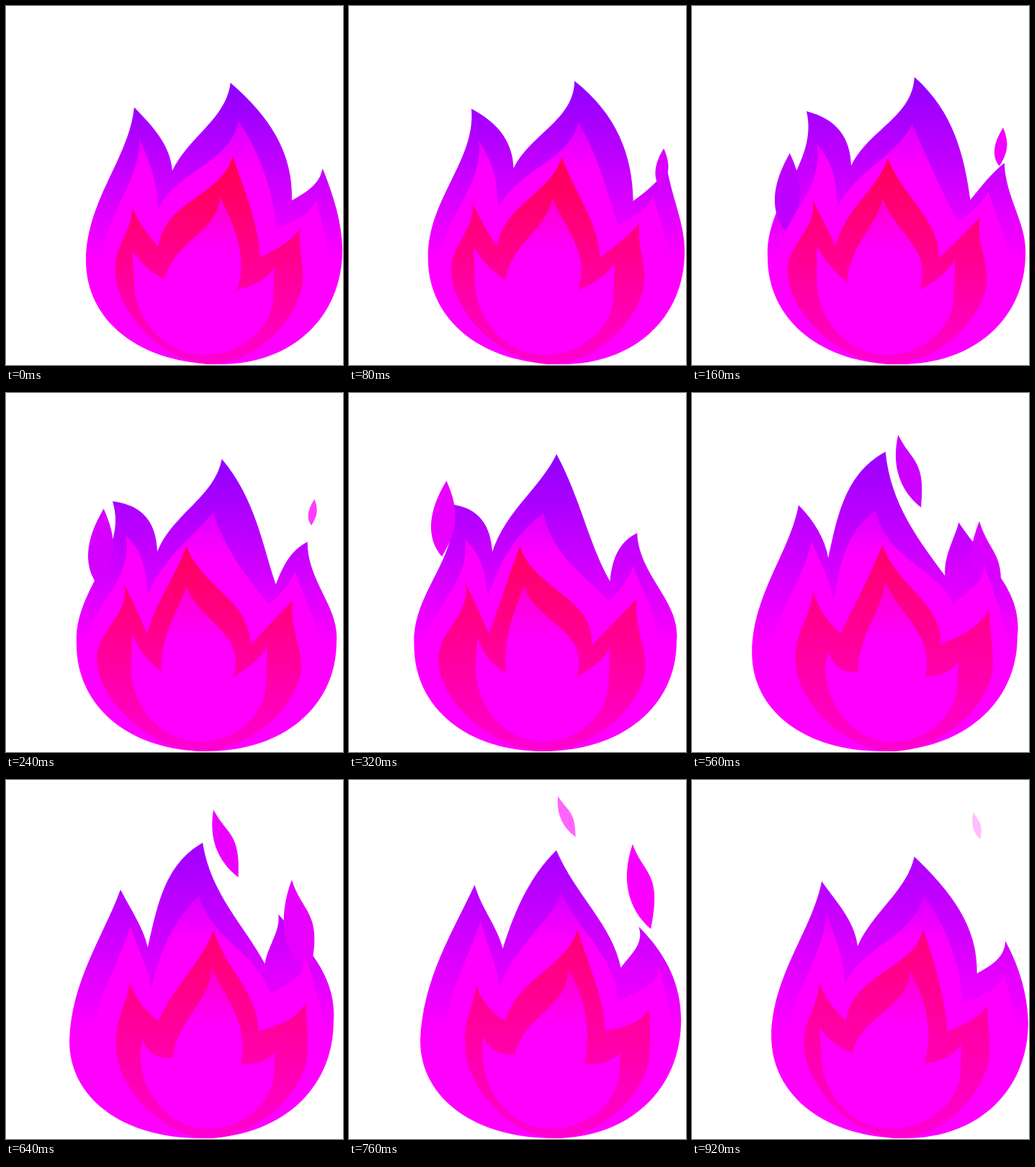
Animation, 468 px wide and 498 px high, one loop 960 ms. Source, as an HTML page:

```html
<!DOCTYPE html>
<html lang="en">
<head>
<meta charset="utf-8">
<title>Flame</title>
<style>
html, body { margin: 0; width: 100%; height: 100%; overflow: hidden; background: #fff; }
svg { display: block; width: 100vw; height: 100vh; }
</style>
</head>
<body>
<svg viewBox="0 0 468 498">
  <defs>
    <linearGradient id="hull" gradientUnits="userSpaceOnUse" x1="0" y1="100" x2="0" y2="352">
      <stop id="hullTop"/><stop offset="1" stop-color="#f0f"/>
    </linearGradient>
    <linearGradient id="glow" gradientUnits="userSpaceOnUse" x1="0" y1="155" x2="0" y2="225">
      <stop stop-color="#d800ff"/><stop offset="1" stop-color="#f0f"/>
    </linearGradient>
    <linearGradient id="red" gradientUnits="userSpaceOnUse" x1="0" y1="205" x2="0" y2="492">
      <stop id="redTop"/><stop offset="1" stop-color="#ff00d2"/>
    </linearGradient>
    <linearGradient id="core" gradientUnits="userSpaceOnUse" x1="0" y1="258" x2="0" y2="345">
      <stop stop-color="#ff00cc"/><stop offset="1" stop-color="#f0f"/>
    </linearGradient>
  </defs>
  <g id="art"></g>
</svg>
<script>
const LOOP = 960, STEP = 40;
const mix = (a, b, u) => a + (b - a) * u;

// Every value sways once per loop: [x, y, cosX, cosY, sinX, sinY].
function sway([x, y, cx = 0, cy = 0, sx = 0, sy = 0], t) {
  const w = 2 * Math.PI * t / LOOP, c = Math.cos(w), s = Math.sin(w);
  return [x + cx * c + sx * s, y + cy * c + sy * s];
}

// points: left side, tip, valley, tip, valley, tip, right side, bottom.
// bends: sideways pull of the two handles between neighbours, per unit length.
const layers = [
  { fill: 'url(#hull)', round: 0.59,
    points: [
      [96.5, 355, 14.5, -2, 1.4, -7], [159, 149, 19, -8.4, -11, 1.3],
      [209, 227, 22, 1.7, 1.2, -6.9], [291, 92.7, 20.7, 13.7, 8.7, -1.2],
      [373, 262, 24, 7.7, 1.7, 3.5], [406, 202, 33.7, 23.3, 12.7, 4.6],
      [459, 339, 8.2, -1.7, 0, 5.8], [279.5, 497, 18]
    ],
    bends: [
      [-.11, .08, 0, -.015, 0, .11], [-.14, -.155, .055, 0, -.18, -.1],
      [-.08, 0, .03, .155, 0, .14], [-.02, -.045, -.125, -.13, -.09, .02],
      [-.03, .04, .14, .16, -.07, -.2], [-.01, -.14, -.04, .07, .12, .02]
    ] },
  { fill: 'url(#glow)', round: 0.59,
    points: [
      [117, 360, 13.3, 0, -10.4], [173, 196, 12.3, -11.2, -7.5, 1],
      [202, 285, 9, -2.8, -4.8, -5.5], [287, 162, 36, -2.9, 1, 3.3],
      [368, 298, 8, 10.8, -2.9, -5.5], [414, 250.5, 17, 17, -12.7, -2.6],
      [440, 365, 6, 0, -4.6], [279.5, 495, 18]
    ],
    bends: [
      [-.08, .1, 0, 0, 0, .1], [-.07, -.08, 0, 0, -.12],
      [-.1, -.01, 0, .2], [.07, -.05, -.16, -.02, .02, .1],
      [.08, .2, 0, 0, 0, -.12], [-.02, -.1]
    ] },
  { fill: 'url(#red)', round: 0.47,
    points: [
      [143, 368, 8.7, -3, -16.7], [169, 273, 5.5, 5, -6.6, -10.5],
      [206, 334, 5.2, 0, -10], [280, 209.7, 34.7, -1.8, -29.4, 2.3],
      [347, 349, 6, 0, -7.5, 1], [408, 301, 0, 8.8, -9.5, -14],
      [414, 376, -2, 0, -4], [280, 497, 5.3, 0, -6.4]
    ],
    bends: [
      [-.11, .13, 0, 0, 0, .11], [.06, .05, 0, 0, -.08, -.06],
      [-.085, .07, -.12, .08, .03, -.04], [.045, -.15, -.07, .085, .04, -.06],
      [.05, .1, 0, 0, -.06, -.1], [.05, -.03, 0, 0, .06]
    ] },
  { fill: 'url(#core)', round: 0.54,
    points: [
      [180, 380, -2.3, 0, -6.4], [181, 346, -5.5, -6.5, -6, -11.8],
      [224, 384, -3, -4.8, -7.9, 2], [275, 264, 22, 1, -24, 4],
      [321, 394, 0, 0, -5.9], [369.6, 365, 3, -1.8, -6.5, -14],
      [368, 402, 3.3, 0, -7], [274.5, 484, 0, 0, -6]
    ],
    bends: [
      [0, 0], [.17, .17, -.07, -.07, -.07, -.07],
      [-.13, .09, -.02, .095, 0, -.11], [-.03, -.235, -.08, .065, .09, -.095],
      [.11, .14, 0, 0, -.04, -.04], [0, 0]
    ] }
];

// Loose sparks: tip starts at x, y and drifts; size shrinks from h.
const sparks = [
  { t0: 120, life: 440, x: 136, dx: -1, y: 228, rise: 178, h: 110, lean: -.08, red: 180 },
  { t0: 40, life: 260, x: 440, dx: -13, y: 214, rise: 75, h: 56, lean: -.13, red: 205 },
  { t0: 440, life: 520, x: 403, dx: -12, y: 244, rise: 204, h: 138, lean: .25, red: 195 },
  { t0: 400, life: 440, x: 282, dx: 9, y: 98, rise: 82, h: 103, lean: .45, red: 130 }
];

const art = document.getElementById('art');
function addPath(fill) {
  const p = document.createElementNS('http://www.w3.org/2000/svg', 'path');
  p.setAttribute('fill', fill);
  return art.appendChild(p);
}
layers.forEach((layer, i) => {
  layer.path = addPath(layer.fill);
  if (i === 0) sparks.forEach(s => { s.path = addPath('none'); });
});

function curve([ax, ay], [bx, by], [p, q]) {
  const dx = bx - ax, dy = by - ay;
  const handle = (u, bend) => `${ax + dx * u - dy * bend} ${ay + dy * u + dx * bend}`;
  return `C${handle(.36, p)} ${handle(.69, q)} ${bx} ${by}`;
}

function flamePath({ points, bends, round }, t) {
  const p = points.map(v => sway(v, t));
  const [lx, ly] = p[0], [rx, ry] = p[6], [bx, by] = p[7];
  return `M${lx} ${ly}` + bends.map((b, i) => curve(p[i], p[i + 1], sway(b, t))).join('') +
    `C${rx} ${mix(ry, by, round)} ${mix(bx, rx, round)} ${by} ${bx} ${by}` +
    `C${mix(bx, lx, round)} ${by} ${lx} ${mix(ly, by, round)} ${lx} ${ly}Z`;
}

function drawSpark(s, t) {
  const u = (t - s.t0) / s.life;
  const alive = u >= 0 && u < 1;
  s.path.style.display = alive ? '' : 'none';
  if (!alive) return;
  const e = 1 - (1 - u) ** 1.5;
  const x = s.x + s.dx * e, y = s.y - s.rise * e;
  const h = s.h * (1 - u ** 4), lean = s.lean * (.4 + .6 * e);
  const at = (side, down) => `${x + h * (side + lean * down)} ${y + h * down}`;
  const right = s.lean > 0 ? [at(.28, .33), at(.055, .37)] : [at(.19, .64), at(.2, .4)];
  s.path.setAttribute('d',
    `M${at(0, 0)}C${at(-.22, .4)} ${at(-.23, .75)} ${at(0, 1)}C${right.join(' ')} ${at(0, 0)}Z`);
  s.path.setAttribute('fill', `rgb(${Math.round(mix(s.red, 255, Math.min(1, 1.2 * e)))},0,255)`);
  s.path.setAttribute('opacity', Math.min(1, (1 - u) / .3));
}

const hullTop = document.getElementById('hullTop');
const redTop = document.getElementById('redTop');

function draw(t) {
  const u = t / LOOP;
  hullTop.setAttribute('stop-color', `rgb(${Math.round(mix(138, 175, u))},0,255)`);
  redTop.setAttribute('stop-color', `rgb(255,0,${Math.round(mix(76, 126, u))})`);
  layers.forEach(layer => layer.path.setAttribute('d', flamePath(layer, t)));
  sparks.forEach(s => drawSpark(s, t));
}

const start = performance.now();
function tick() {
  const t = (performance.now() - start) % LOOP;
  draw(Math.floor(t / STEP) * STEP);
  requestAnimationFrame(tick);
}
tick();
</script>
</body>
</html>
```
